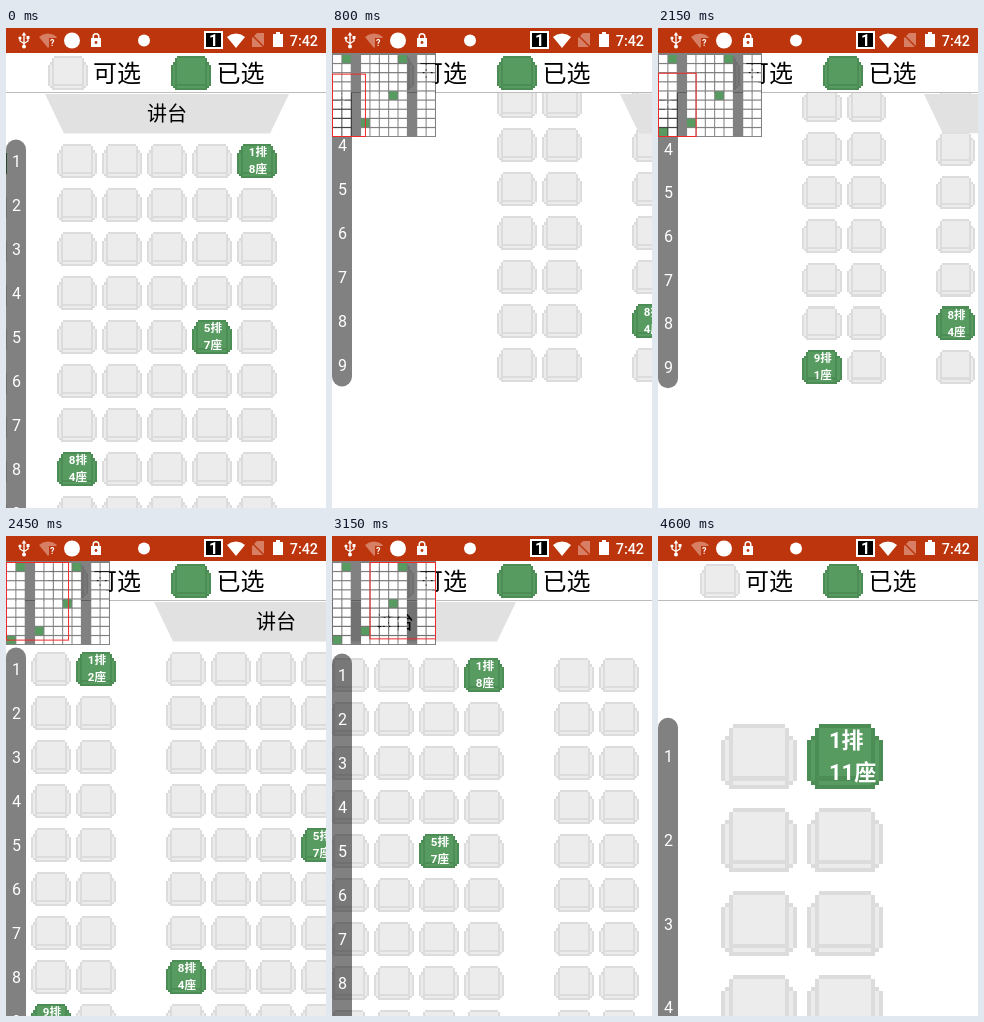
An HTML page with a canvas that plays this animation: 320 px wide and 480 px high, repeating every 5.05 s.

```html
<!DOCTYPE html>
<html lang="zh">
<head>
<meta charset="utf-8">
<style>
html, body { margin: 0; width: 100%; height: 100%; overflow: hidden; background: #fff; }
canvas { display: block; }
</style>
</head>
<body>
<canvas id="stage" width="320" height="480"></canvas>
<script>
const ctx = document.getElementById('stage').getContext('2d');
const LOOP = 5050, STEP = 50;
const ROWS = 9, COLS = 11, AISLES = [2, 8];
const PITCH_X = 45, PITCH_Y = 44, SEAT_W = 40, SEAT_H = 34;
const FONT = 'Roboto, "Noto Sans CJK SC", "Noto Sans CJK", sans-serif';
const SHADE = 'rgba(0,0,0,.494)', GREEN = '#579b60';
const FREE = { fill: '#ececec', line: '#dcdcdc' };
const TAKEN = { fill: GREEN, line: '#4b8d55' };

const linear = p => p;
const out = p => 1 - (1 - p) ** 2;
const inOut = p => (1 - Math.cos(Math.PI * p)) / 2;

// time, scale, x, y, easing towards this pose
const poses = [
  [260, 1, -84, 116, linear],
  [800, 1, 165, -32, linear],
  [1150, 1, 212, -72, out],
  [1420, 1, 212, -72, linear],
  [1780, 1.9, 196, -407, inOut],
  [1850, 1.9, 196, -407, linear],
  [1950, 1.55, 170, -270, linear],
  [2150, .991, 144, -26.8, out],
  [2450, 1, 25, 116, inOut],
  [2520, 1, 25, 116, linear],
  [2800, 1, -129, 116, linear],
  [3050, 1, -170, 116, out],
  [3080, 1, -170, 116, linear],
  [3150, 1, -183, 122, linear],
  [3550, 1, -276, 209, out],
  [3917, 1, -276, 209, linear],
  [4250, 1.9, -706.5, 188, inOut]
];

// row, column, time of selection
const picks = [[0, 1, 0], [0, 7, 0], [4, 6, 0], [7, 3, 0], [8, 0, 1450], [0, 10, 3950]];
const mapTimes = [[300, 1300], [1450, 3800], [3950, 4600]];

function poseAt(t) {
  const i = poses.findIndex(p => p[0] > t);
  if (i === 0) return poses[0].slice(1, 4);
  if (i < 0) return poses[poses.length - 1].slice(1, 4);
  const a = poses[i - 1], b = poses[i];
  const k = b[4]((t - a[0]) / (b[0] - a[0]));
  return [1, 2, 3].map(n => a[n] + (b[n] - a[n]) * k);
}

const isTaken = (r, c, t) => picks.some(p => p[0] === r && p[1] === c && t >= p[2]);

function eachSeat(draw) {
  for (let r = 0; r < ROWS; r++)
    for (let c = 0; c < COLS; c++)
      if (!AISLES.includes(c)) draw(r, c);
}

function rect(color, x, y, w, h) {
  ctx.fillStyle = color;
  ctx.fillRect(x, y, w, h);
}

function text(str, x, y, size, color, align = 'left', weight = 400) {
  ctx.font = `${weight} ${size}px ${FONT}`;
  ctx.textAlign = align;
  ctx.fillStyle = color;
  ctx.fillText(str, x, y);
}

function shape(color, ...pts) {
  ctx.fillStyle = color;
  ctx.beginPath();
  pts.forEach(p => ctx.lineTo(...p));
  ctx.fill();
}

function disc(color, x, y, r) {
  ctx.fillStyle = color;
  ctx.beginPath();
  ctx.arc(x, y, r, 0, 7);
  ctx.fill();
}

// Blocky seat on a 19 by 16 grid
function seat(x, y, s, { fill, line }) {
  const gx = n => Math.round(x + n * SEAT_W * s / 19);
  const gy = n => Math.round(y + n * SEAT_H * s / 16);
  const cells = (color, c, r, w, h) =>
    rect(color, gx(c), gy(r), gx(c + w) - gx(c), gy(r + h) - gy(r));
  cells(line, 3, 0, 13, 1);
  cells(line, 2, 1, 15, 15);
  cells(line, 1, 3, 17, 12);
  cells(line, 0, 4, 19, 10);
  cells(fill, 3, 1, 13, 12);
  cells(fill, 3, 14, 13, 1);
  cells(fill, 1, 4, 1, 10);
  cells(fill, 17, 4, 1, 10);
}

function seats(t, s, tx, ty) {
  eachSeat((r, c) => {
    const x = tx + c * PITCH_X * s, y = ty + r * PITCH_Y * s;
    if (x > 320 || x < -90 || y > 480 || y < -60) return;
    const taken = isTaken(r, c, t);
    seat(x, y, s, taken ? TAKEN : FREE);
    if (!taken) return;
    const label = (str, dy) => text(str, x + 11.8 * s, y + dy * s, 11.6 * s, '#fff', 'left', 700);
    label(`${r + 1}排`, 12.4);
    label(`${c + 1}座`, 29.4);
  });
}

function rowBar(s, ty) {
  const pad = 2.5 + 2 * s;
  ctx.fillStyle = SHADE;
  ctx.beginPath();
  ctx.roundRect(0, ty - pad, 20, (8 * PITCH_Y + SEAT_H) * s + 2 * pad, 10);
  ctx.fill();
  for (let r = 0; r < ROWS; r++)
    text(r + 1, 10.5, ty + (r * PITCH_Y + SEAT_H / 2) * s + 6, 16, '#fff', 'center');
}

function header() {
  rect('#fff', 0, 25, 320, 40);
  rect('#bcbcbc', 0, 64, 320, 1);
  seat(42, 28, 1, FREE);
  seat(165, 28, 1, TAKEN);
  text('可选', 87, 54, 24, '#000');
  text('已选', 210.5, 54, 24, '#000');
}

function podium(s, tx) {
  const x = tx + 245 * s, bottom = 66 + 39.5 * s;
  shape('#e1e1e1', [x - 122 * s, 66], [x + 122 * s, 66], [x + 103 * s, bottom], [x - 103 * s, bottom]);
  text('讲台', x, 66 + 27 * s, 20 * s, '#000', 'center');
}

function overview(t, s, tx, ty) {
  const w = 9.36, h = 9.14;
  rect(SHADE, 0, 25, 104, 84);
  eachSeat((r, c) => rect(isTaken(r, c, t) ? GREEN : '#fff', 1 + c * w, 27 + r * h, w - 1, h - 1.2));
  const px = v => Math.min(103.5, Math.max(.5, (v - tx) / (PITCH_X * s) * w));
  const py = v => Math.min(108.5, Math.max(26.5, 26 + (v - ty) / (PITCH_Y * s) * h));
  const x = px(0), y = py(65);
  ctx.strokeStyle = '#f02a2a';
  ctx.lineWidth = 1;
  ctx.strokeRect(x, y, Math.min(103.5, px(320) + 1.2) - x, Math.min(108.5, py(480) + 2.5) - y);
}

function wifi(x, color) {
  shape(color, [x - 9, 9], [x - 5, 6.5], [x, 5.5], [x + 5, 6.5], [x + 9, 9], [x, 20]);
}

function usb() {
  ctx.strokeStyle = '#fff';
  ctx.lineWidth = 1.3;
  ctx.beginPath();
  ctx.moveTo(18, 18); ctx.lineTo(18, 6);
  ctx.moveTo(14, 10); ctx.lineTo(14, 13); ctx.lineTo(18, 15.5);
  ctx.lineTo(22, 13); ctx.lineTo(22, 9);
  ctx.stroke();
  shape('#fff', [18, 4], [20.3, 7.5], [15.7, 7.5]);
  disc('#fff', 18, 18.5, 2);
  disc('#fff', 14, 10, 1.6);
  rect('#fff', 20.5, 8, 3, 3);
}

function statusBar() {
  const back = '#bd350c', dim = '#d67f65';
  rect(back, 0, 0, 320, 25);
  usb();
  wifi(42, dim);
  rect(back, 43, 10, 8, 10);
  text('?', 44, 18, 9, '#fff', 'left', 700);
  disc('#fff', 66, 12.5, 8);
  // padlock
  ctx.strokeStyle = '#fff';
  ctx.lineWidth = 1.5;
  ctx.beginPath();
  ctx.arc(90, 8.5, 2.8, Math.PI, 0);
  ctx.lineTo(92.8, 11);
  ctx.moveTo(87.2, 8.5);
  ctx.lineTo(87.2, 11);
  ctx.stroke();
  rect('#fff', 85, 10, 10, 9);
  disc(back, 90, 14.5, 1.4);
  disc('#fff', 138, 12.5, 6);
  rect('#fff', 198, 3, 19, 18);
  rect('#000', 200, 5, 15, 14);
  text('1', 207.5, 18, 16, '#fff', 'center', 700);
  wifi(230, '#fff');
  // missing SIM card
  shape(dim, [251, 5], [258, 5], [258, 19], [246, 19], [246, 10]);
  ctx.strokeStyle = back;
  ctx.beginPath();
  ctx.moveTo(245, 6);
  ctx.lineTo(259, 20);
  ctx.stroke();
  rect('#fff', 267, 6, 10, 13);
  rect('#fff', 270, 4, 4, 2);
  text('7:42', 312, 18, 14.3, '#fff', 'right', 500);
}

function draw(t) {
  const [s, tx, ty] = poseAt(t);
  rect('#fff', 0, 0, 320, 480);
  seats(t, s, tx, ty);
  rowBar(s, ty);
  header();
  podium(s, tx);
  if (mapTimes.some(([a, b]) => t >= a && t < b)) overview(t, s, tx, ty);
  statusBar();
}

let start;
function tick(now) {
  start ??= now;
  draw(Math.floor((now - start) % LOOP / STEP) * STEP);
  requestAnimationFrame(tick);
}
draw(0);
requestAnimationFrame(tick);
</script>
</body>
</html>
```
